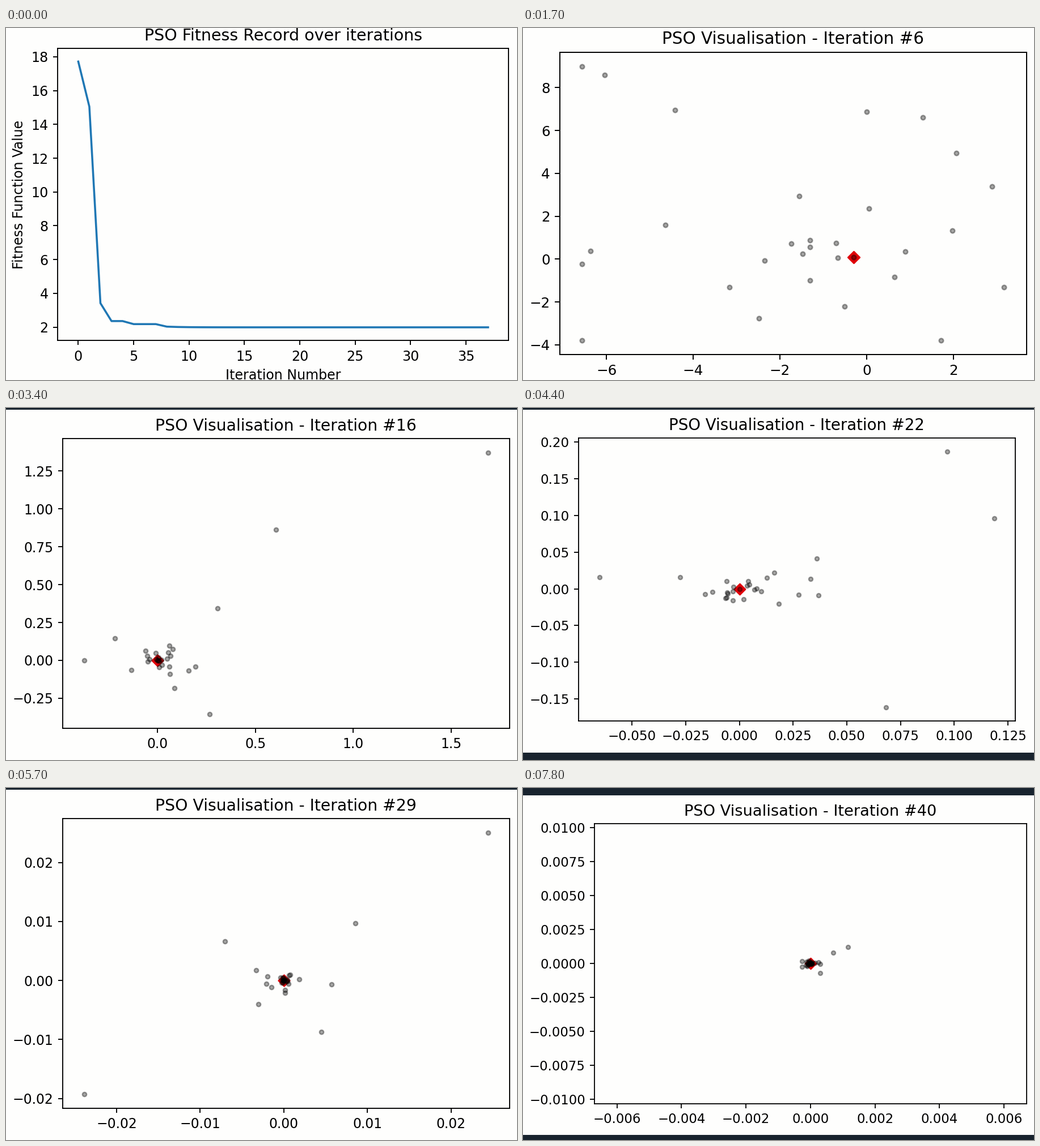
Animation, 901 px wide and 622 px high, one loop 8000 ms. Source, as a matplotlib script:

```python
import numpy as np
import matplotlib.pyplot as plt
from matplotlib.animation import FuncAnimation
from matplotlib.patches import Rectangle
from matplotlib.ticker import MaxNLocator

W, H, DPI = 901, 622, 100
AX_W, AX_H = 334.8, 217.44            # default axes size in points
PAPER, BACKDROP = "#fefefd", "#18232e"
COUNT, LAST = 30, 40

plt.rcParams["font.family"] = "DejaVu Sans"
fig = plt.figure(figsize=(W / DPI, H / DPI), dpi=DPI)

# Start of each iteration in tenths of a second: a nearly even pace.
STARTS = np.rint(np.interp(range(LAST + 1), [0, 6, 12, 22, 29, 39, 40],
                           [6, 17, 27, 44, 57, 74, 78]))

FITNESS = np.array([17.72, 15.05, 3.42, 2.36, 2.36, 2.18, 2.18, 2.18, 2.03, 2.01]
                   + [1.99 + 0.01 * 0.5 ** i for i in range(28)])

swarms = {0: np.random.default_rng(4).uniform(-18, 18, (COUNT, 2))}


def add_swarm(step, spread, outer, centre=(0, 0)):
    """A few outliers span the plot, the rest gathers around the centre."""
    rng = np.random.default_rng(step)
    outer = np.array(outer)
    size = (COUNT - len(outer), 2)
    inner = centre + spread * rng.normal(size=size) * rng.uniform(0, 2, (size[0], 1))
    swarms[step] = np.vstack([outer, inner.clip(outer.min(axis=0), outer.max(axis=0))])


add_swarm(6, 2.2, [(-6.56, 8.98), (-6.04, 8.58), (3.17, -1.31), (2.89, 3.4),
                   (1.71, -3.78), (-6.36, 0.37)], (-1.5, 0.2))
add_swarm(12, 0.28, [(-0.748, 0.99), (0.824, 0.98), (-1.29, 0), (1.78, -0.558),
                     (-0.585, -0.592)])
add_swarm(16, 0.07, [(1.69, 1.372), (0.604, 0.863), (0.306, 0.342),
                     (0.265, -0.357), (-0.376, 0), (-0.217, 0.144)])
add_swarm(22, 0.009, [(0.0968, 0.187), (0.1187, 0.0963), (0.0683, -0.1618),
                      (-0.0652, 0.016), (0.036, 0.041), (0.0367, -0.009)])
add_swarm(29, 0.001, [(0.02444, 0.02507), (0.00855, 0.00973), (-0.00707, 0.00666),
                      (-0.0239, -0.01932), (0.0045, -0.00868), (0.0057, -0.0007)])
add_swarm(40, 0.00008, [(0.00117, 0.00121), (0.0007, 0.0008), (0.0003, -0.0007),
                        (-0.00026, -0.00025)])


def best_at(n):
    gain = np.sqrt((FITNESS[n] - 2) / 0.18) if n < 6 else 0.52 ** (n - 6)
    return np.array([-0.305, 0.085]) * gain


def swarm_at(n):
    """Shrink geometrically between known swarms, with some wander."""
    a = max(k for k in swarms if k <= n)
    b = min(k for k in swarms if k >= n)
    t = (n - a) / max(b - a, 1)
    size_a, size_b = swarms[a].std(axis=0), swarms[b].std(axis=0)
    p = (1 - t) * swarms[a] / size_a + t * swarms[b] / size_b
    turn, grow = np.random.default_rng(100 + n).normal(0, 0.35, (2, COUNT)) * np.sin(np.pi * t)
    c, s = np.cos(turn), np.sin(turn)
    p = np.column_stack([c * p[:, 0] - s * p[:, 1], s * p[:, 0] + c * p[:, 1]])
    p *= (1 + grow)[:, None] * size_a ** (1 - t) * size_b ** t
    p[-1] = best_at(n)
    return p


def limits(v, floor=0.0):
    pad = 0.053 * np.ptp(v)
    return min(v.min() - pad, -floor), max(v.max() + pad, floor)


def ticks(lo, hi):
    vals = MaxNLocator(9, steps=[1, 2, 2.5, 5, 10]).tick_values(lo, hi)
    step = vals[1] - vals[0]
    digits = next(d for d in range(9) if abs(round(step, d) - step) < step * 1e-6)
    vals = [round(v, digits) + 0.0 for v in vals if lo <= v <= hi]
    return vals, [f"{v:.{digits}f}".replace("-", "\u2212") for v in vals]


def label_width(text):
    """Width in points of a number set in 10 pt."""
    return sum({".": 3.18, "\u2212": 8.38}.get(ch, 6.36) for ch in text)


def make_axes(left, top, scale, xlim, ylim, title):
    """Axes in default proportions; scale is pixels per point."""
    k = scale * 72 / DPI
    w, h = AX_W * scale, AX_H * scale
    ax = fig.add_axes([left / W, 1 - (top + h) / H, w / W, h / H], facecolor="none")
    ax.set(xlim=xlim, ylim=ylim)
    ax.set_xticks(*ticks(*xlim))
    ax.set_yticks(*ticks(*ylim))
    ax.tick_params(labelsize=10 * k, length=3.5 * k, width=0.8 * k, pad=3.5 * k)
    for spine in ax.spines.values():
        spine.set_linewidth(0.8 * k)
    ax.set_title(title, fontsize=12 * k, pad=6 * k)
    return ax, k


def paper(top, height):
    fig.add_artist(Rectangle((0, 1 - (top + height) / H), 1, height / H,
                             transform=fig.transFigure, fc=PAPER, lw=0, zorder=-1))


def draw_record():
    paper(0, H)
    ax, k = make_axes(91.3, 36, 2.374, (-1.85, 38.85), (1.21, 18.5),
                      "PSO Fitness Record over iterations")
    ax.plot(FITNESS, color="#1f77b4", lw=1.5 * k)
    ax.set_xlabel("Iteration Number", fontsize=10 * k, labelpad=4 * k)
    ax.set_ylabel("Fitness Function Value", fontsize=10 * k, labelpad=4 * k)


def draw_swarm(n):
    pts, best = swarm_at(n), best_at(n)
    xlim, ylim = limits(pts[:, 0], 0.0067), limits(pts[:, 1], 0.0103)
    xt, xl = ticks(*xlim)
    gap = (xlim[1] - xt[-1]) / (xlim[1] - xlim[0]) * AX_W
    over = max(0, label_width(xl[-1]) / 2 - gap)
    wide = max(map(label_width, ticks(*ylim)[1]))

    # The picture is fitted to the stage width, so its height varies.
    scale = 876.5 / (7 + AX_W + wide + over)
    top = (306 if over else 313) - 131.75 * scale
    paper(top, 263.5 * scale)
    left = 887.8 - (AX_W + over) * scale
    ax, k = make_axes(left, top + 21.8 * scale, scale, xlim, ylim,
                      f"PSO Visualisation - Iteration #{n}")
    ax.scatter(*best, s=36 * k * k, marker="D", color="#e00008", lw=k)
    ax.scatter(pts[:, 0], pts[:, 1], s=10 * k * k, color="black", alpha=0.35, lw=k)


def draw(i):
    fig.clear()
    fig.set_facecolor(BACKDROP)
    n = int((STARTS <= i).sum()) - 1
    if n < 0:
        draw_record()
    else:
        draw_swarm(n)
    return []


anim = FuncAnimation(fig, draw, frames=80, interval=100, init_func=lambda: [],
                     repeat=True, repeat_delay=0, blit=False)
plt.show()
```
